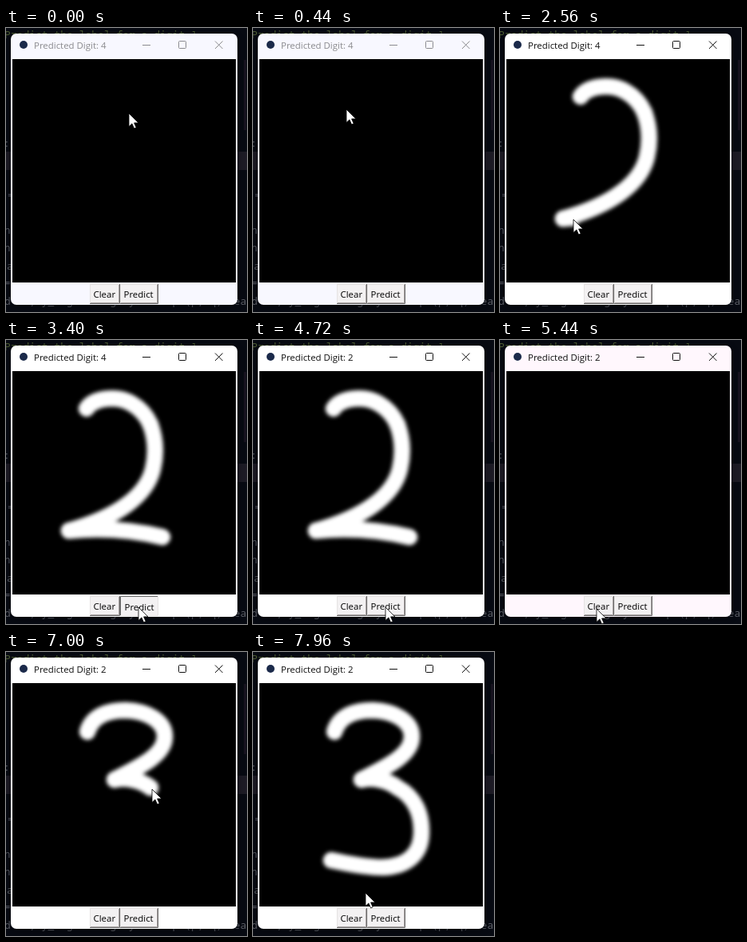
An HTML page for the animation above (8 s loop, 302 px wide and 356 px high).

```html
<!DOCTYPE html>
<html lang="en">
<head>
<meta charset="utf-8">
<title>Digit pad</title>
<style>
  html, body { margin: 0; width: 100%; height: 100%; overflow: hidden; background: #070a12; }
  svg { display: block; width: 100%; height: 100%; }
  .ui { font: 11.45px "Open Sans", "Noto Sans", sans-serif; }
  .code { font: 13px "Noto Sans Mono", "DejaVu Sans Mono", monospace; fill: #5d6068; white-space: pre; }
  .ink path { fill: none; stroke: #fff; stroke-width: 20.5; stroke-linecap: round; stroke-linejoin: round; }
</style>
</head>
<body>
<svg viewBox="0 0 302 356" preserveAspectRatio="none">
  <defs>
    <filter id="soft" filterUnits="userSpaceOnUse" x="8" y="39" width="280" height="280" color-interpolation-filters="sRGB">
      <feGaussianBlur stdDeviation="2.4"/>
    </filter>
    <filter id="shade" filterUnits="userSpaceOnUse" x="-20" y="-20" width="342" height="396">
      <feGaussianBlur stdDeviation="5"/>
    </filter>
  </defs>

  <rect width="302" height="356" fill="#070a12"/>
  <rect y="155" width="302" height="23" fill="#1d1b25"/>
  <rect x="298" y="40" width="3" height="88" fill="#17131f"/>
  <g id="code" class="code"></g>
  <rect x="6" y="9" width="284" height="340" rx="8" fill="#000" opacity=".45" filter="url(#shade)"/>

  <rect id="win" x="6" y="7" width="284" height="340" rx="7"/>
  <rect x="8" y="39" width="280" height="280"/>
  <circle cx="22" cy="21" r="5" fill="#1b2a4a"/>
  <text id="title" class="ui" x="35" y="26"></text>
  <g id="controls" fill="none">
    <path d="M171 21.5H181"/>
    <rect x="216.5" y="16.5" width="9" height="9" rx="1"/>
    <path d="M262 16.5L271.5 26M271.5 16.5L262 26"/>
  </g>

  <g id="ink" class="ink" filter="url(#soft)"></g>
  <g id="buttons"></g>
  <path id="cursor" d="M0 0V16.5L3.9 12.9L6.6 19L9.2 17.8L6.6 11.9H12Z" fill="#fff" stroke="#000" stroke-width=".8"/>
</svg>
<script>
const LOOP = 8000, STEP = 40;
const $ = id => document.getElementById(id);

function add(parent, tag, attrs, text) {
  const el = document.createElementNS("http://www.w3.org/2000/svg", tag);
  for (const k in attrs) el.setAttribute(k, attrs[k]);
  if (text) el.textContent = text;
  parent.append(el);
  return el;
}

// Editor text peeking out around the window: x, baseline, text, colour
[
  [-2, 13, "Predict the label for a digit   ]", "#4d5c33"],
  [-3, 149, ":]"], [2, 214, "="], [-10, 258, "in"], [-10, 280, "in"],
  [1, 303, "a"], [-2, 324, "="],
  [-2, 347, "d su, y_digits = gray.reshape(p, q) "],
  [270, 347, "/leab"]
].forEach(([x, y, s, fill]) => add($("code"), "text", fill ? { x, y, style: "fill:" + fill } : { x, y }, s));

// Pen strokes: path, start, end, time the ink is cleared
const strokes = [
  ["M101 86C110 72 140 69 158 80C170 87 177 97 181 106", 1320, 1880, 5400],
  ["M181 106C188 125 188 145 184 162C176 195 140 222 79 239", 1880, 2520, 5400],
  ["M79 239C110 236 150 236 196 247", 2520, 2920, 5400],
  ["M102 100C108 80 128 73 150 73C176 74 199 86 199 106C199 128 172 142 136 160", 6480, 6840, LOOP],
  ["M136 160C150 157 168 160 181 170", 6840, 7000, LOOP],
  ["M181 170C204 182 212 205 211 228C210 256 190 269 162 270C138 270 118 265 98 261", 7000, 7640, LOOP]
].map(([d, from, to, gone]) => {
  const el = add($("ink"), "path", { d });
  return { el, from, to, gone, len: el.getTotalLength() };
});

// Free pointer moves: time, x, y
const moves = [
  [0, 154, 107], [40, 153, 107], [440, 117, 102], [840, 102, 93], [960, 102, 91],
  [1120, 102, 92], [1160, 102, 90], [1280, 102, 90], [1320, 102, 89],
  [2920, 197, 248], [3000, 197, 250], [3160, 188, 285], [3320, 167, 333], [3400, 166, 335],
  [5120, 166, 335], [5280, 123, 337], [5440, 121, 337],
  [5600, 121, 337], [5800, 125, 270], [6080, 112, 158], [6320, 102, 105], [6400, 103, 101], [6480, 103, 101],
  [7640, 99, 262], [7680, 100, 265], [7920, 100, 265], [7960, 141, 302], [LOOP, 141, 302]
];

function makeButton(x, w, label) {
  const g = add($("buttons"), "g", {});
  add(g, "rect", { x, y: 321, width: w, height: 25, fill: "#f3f1f2" });
  const light = add(g, "path", { d: `M${x + .5} 346V321.5H${x + w}`, fill: "none" });
  const dark = add(g, "path", { d: `M${x} 345.5H${x + w - .5}V321`, fill: "none" });
  const inner = add(g, "path", { d: `M${x + 1} 344.5H${x + w - 1.5}V322`, fill: "none" });
  const text = add(g, "text", { class: "ui", x: x + 4.5, y: 338 }, label);
  return down => {
    light.setAttribute("stroke", down ? "#696969" : "#e6e3e3");
    dark.setAttribute("stroke", down ? "#e6e3e3" : "#696969");
    inner.setAttribute("stroke", down ? "#f3f1f2" : "#aaa4a4");
    text.setAttribute("transform", down ? "translate(1 1)" : "translate(0 0)");
  };
}
const pressClear = makeButton(105, 38, "Clear");
const pressPredict = makeButton(143, 48, "Predict");

const tints = [[0, "#f8f8ff"], [1320, "#fafffe"], [2160, "#ffffff"], [5120, "#fff7fd"], [5600, "#ffffff"]];

function pointer(t) {
  const s = strokes.find(s => t >= s.from && t < s.to);
  if (s) {
    const p = s.el.getPointAtLength(s.len * (t - s.from) / (s.to - s.from));
    return [p.x + 1.5, p.y + 2];
  }
  const i = Math.max(1, moves.findIndex(m => m[0] > t));
  const [t0, x0, y0] = moves[i - 1], [t1, x1, y1] = moves[i];
  const k = (t - t0) / (t1 - t0);
  return [x0 + (x1 - x0) * k, y0 + (y1 - y0) * k];
}

function draw(t) {
  for (const s of strokes) {
    const on = t >= s.from && t < s.gone;
    s.el.style.display = on ? "" : "none";
    const p = Math.min(1, Math.max(0, (t - s.from) / (s.to - s.from)));
    s.el.style.strokeDasharray = p < 1 ? `${s.len * p} 2000` : "none";
  }
  const active = t >= 1320;
  $("win").setAttribute("fill", tints.findLast(c => c[0] <= t)[1]);
  $("title").textContent = "Predicted Digit: " + (t < 3600 ? 4 : 2);
  $("title").setAttribute("fill", active ? "#111" : "#8b8b8f");
  $("controls").setAttribute("stroke", active ? "#111" : "#8b8b8f");
  pressPredict(t >= 3360 && t < 3520);
  pressClear(t >= 5320 && t < 5400);
  const [x, y] = pointer(t);
  $("cursor").setAttribute("transform", `translate(${Math.round(x)} ${Math.round(y)})`);
}

const start = performance.now();
function tick() {
  const t = (performance.now() - start) % LOOP;
  draw(Math.floor(t / STEP) * STEP);
  requestAnimationFrame(tick);
}
tick();
</script>
</body>
</html>
```
